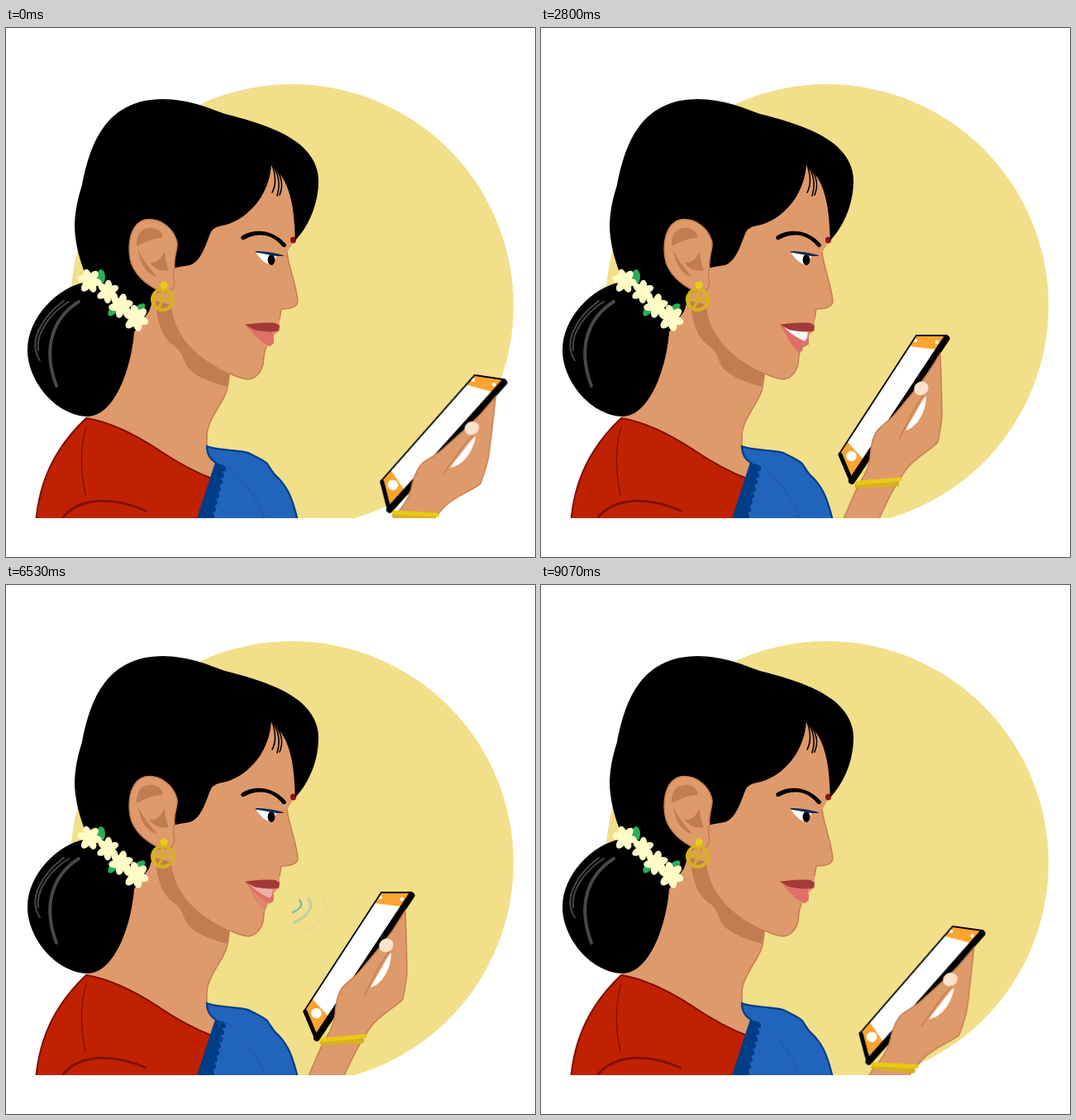
Recreate the animation shown at these times as an HTML page without scripts. Size 640 by 640 pixels, loop 9610 ms.

```html
<!DOCTYPE html>
<html lang="en">
<head>
<meta charset="utf-8">
<title>Talking to a phone</title>
<style>
  html, body { margin: 0; width: 100%; height: 100%; overflow: hidden; background: #fff; }
  svg { display: block; width: 100%; height: 100%; }

  .skin { fill: #df9a6b; }
  .shade { fill: #c17d4f; }
  .edge { stroke: #c47e4f; stroke-width: 1.5; }
  .line { fill: none; stroke-linecap: round; stroke-linejoin: round; }
  .petal { fill: #fffbc6; }
  .leaf { fill: #2bae5a; }
  .gold { stroke: #d6b21e; }
  .upper { fill: #a23b38; }
  .lower { fill: #e06f68; }
  .orange { fill: #fca430; }

  .arm { transform-origin: 454px 372px; animation: reach 9.61s linear infinite; }
  .talk { opacity: 0; animation: talk 9.61s ease-in-out infinite; }
  .wave { opacity: 0; stroke: #3f9fd9; animation: wave 9.61s ease-in-out infinite; }
  .w2 { animation-delay: .11s; }
  .w3 { animation-delay: .22s; }

  @keyframes reach {
    0% { transform: translate(113px, 48px) rotate(8.4deg); }
    24.66%, 79.08% { transform: translate(0, 0) rotate(0deg); }
    94.38%, 100% { transform: translate(44px, 41px) rotate(7.9deg); }
  }
  @keyframes talk {
    0%, 29.12% { opacity: 0; }
    29.13%, 39.54%, 49.95%, 60.35%, 70.76% { opacity: 1; }
    34.34%, 44.75%, 55.15%, 65.56%, 75.96%, 100% { opacity: 0; }
  }
  @keyframes wave {
    0%, 33.82%, 44.22%, 54.63%, 65.04%, 75.44%, 100% { opacity: 0; }
    39.02%, 49.43%, 59.83%, 70.24% { opacity: 1; }
  }
</style>
</head>
<body>
<svg viewBox="0 0 640 640">
  <defs>
    <ellipse id="petal" class="petal" cy="-7" rx="4.8" ry="8"/>
    <g id="flower">
      <use href="#petal" transform="rotate(-75)"/>
      <use href="#petal" transform="rotate(-20)"/>
      <use href="#petal" transform="rotate(40)"/>
      <use href="#petal" transform="rotate(100)"/>
      <use href="#petal" transform="rotate(155)"/>
      <use href="#petal" transform="rotate(215)"/>
    </g>
  </defs>

  <circle cx="346" cy="336" r="268" fill="#f1df8a"/>

  <!-- neck -->
  <path class="skin" d="M150 300 H215 L271 400 C270 420 270 436 262 450 C250 470 243 482 243 494 V506 C244 517 248 523 256 528 L249 548 L97 474 L100 440Z"/>
  <path class="line edge" d="M270 420 C269 432 268 440 262 450 C250 470 243 482 243 494 V506"/>
  <path class="shade" d="M181 330 L200 335 C203 366 222 396 271 418 L267 434 C245 428 225 420 218 408 C214 400 213 392 205 386 C190 376 183 360 181 330Z"/>

  <!-- face -->
  <path class="skin" d="M200 250 L260 180 L322 150 L352 190 L350 255 L341 270 C341 285 351 310 353 330 C353 337 346 340 333 340 L331 352 V366 L324 372 V382 L315 386 C311 395 312 402 311 407 C308 419 300 425 292 425 C285 424 277 421 271 418 C222 396 203 366 200 335Z"/>
  <path class="line edge" d="M340 272 C341 285 351 310 353 330 C353 337 346 340 333 340 L331 352 M315 386 C311 395 312 402 311 407 C308 419 300 425 292 425 C285 424 277 421 271 418"/>
  <ellipse cx="347.5" cy="256.5" rx="3.5" ry="4" fill="#8f1018"/>

  <!-- blouse -->
  <g class="line" stroke="#7f0f0a" stroke-width="2">
    <path fill="#c02100" d="M36 600 C40 545 62 505 97 472 C128 477 157 492 187 512 C208 526 228 537 249 545 L232 600Z"/>
    <path d="M97 483 C90 505 90 535 96 565" stroke-width="1.4"/>
    <path d="M69 592 C90 567 130 567 169 584" stroke-width="2.8"/>
  </g>

  <!-- sari -->
  <path d="M243 506 C255 511 285 511 293 514 C305 520 312 523 316 527 C320 533 324 541 329 544 C343 558 348 575 354 600 H230 L254 526 C247 522 243 515 243 506Z" fill="#2164bc" stroke="#003d87" stroke-width="2.2"/>
  <path d="M254 526 L264 529 L248 600 H229Z" fill="#003d87"/>
  <path class="line" d="M263 533 L247 598" stroke="#003d87" stroke-width="6.5" stroke-dasharray="0 8.5"/>
  <path class="line" d="M268 530 C285 545 302 565 313 592" stroke="#1b54a4" stroke-width="1"/>

  <!-- hair -->
  <path d="M97 300 C90 284 83 260 83 238 C84 215 89 200 92 190 C101 145 118 86 190 86 C225 87 245 97 265 104 C310 115 340 127 358 143 C372 156 379 171 378 188 C377 215 366 240 350 257 C349 240 349 205 335 182 L321 162 C321 182 312 203 300 216 C288 229 276 236 262 239 C256 240 253 241 249 245 C244 253 238 283 222 287 C213 289 210 288 203 291 L195 314 L180 322 L173 343 L155 368 C152 410 132 470 98 470 C58 468 26 425 26 390 C26 350 62 314 97 307Z"/>
  <g class="line" stroke="#000" stroke-width="1.6">
    <path d="M321 163 C326 176 328 188 322 199"/>
    <path d="M322 165 C331 178 332 190 328 203"/>
    <path d="M323 165 C334 179 336 190 331 202"/>
  </g>
  <g class="line" stroke="#484848">
    <path d="M88 331 C58 350 43 385 61 433" stroke-width="4"/>
    <path d="M70 330 C43 350 26 380 41 402" stroke-width="2"/>
    <path d="M76 331 C52 346 36 370 39 390" stroke-width="2"/>
  </g>

  <!-- flowers -->
  <ellipse class="leaf" cx="115" cy="301" rx="5" ry="9"/>
  <ellipse class="leaf" cx="161" cy="340" rx="4.5" ry="9" transform="rotate(50 161 340)"/>
  <ellipse class="leaf" cx="130" cy="341" rx="4.5" ry="9" transform="rotate(40 130 341)"/>
  <use href="#flower" x="101" y="306"/>
  <use href="#flower" transform="translate(123 319) rotate(25) scale(.95)"/>
  <use href="#flower" transform="translate(139 336) rotate(-25)"/>
  <use href="#flower" transform="translate(157 351) rotate(10) scale(1.08)"/>

  <!-- ear -->
  <path class="skin edge" d="M204 290 C202 278 208 268 207 260 C203 241 185 229 168 232 C152 236 147 258 150 278 C153 298 172 312 186 318 C198 323 206 315 203 303 C202 297 203 292 204 290Z"/>
  <g class="shade">
    <path d="M158 264 C157 248 166 240 178 242 C187 244 191 250 189 254 C178 254 168 259 158 264Z"/>
    <path d="M160 268 C165 280 174 291 183 301 C170 298 162 285 160 268Z"/>
    <path d="M192 270 C192 277 194 286 197 293 C187 295 178 291 174 284 C184 284 188 278 192 270Z"/>
  </g>
  <g class="line gold" stroke-width="4">
    <circle cx="189.5" cy="328.5" r="12.5"/>
    <path d="M179 328 H200 M191 318 L186 328 M191 328 L185 338" stroke-width="3"/>
  </g>
  <circle cx="191" cy="311" r="4.6" fill="#e8cb16"/>

  <!-- brow and eye -->
  <path d="M286 251 C302 242 324 244 339 262 C339 266 336 266 334 264 C322 249 305 247 288 256 C284 257 283 253 286 251Z"/>
  <path d="M302 271 L328 275 L321 287 C313 285 307 279 302 271Z" fill="#fff"/>
  <ellipse cx="321" cy="280.5" rx="4.4" ry="6.4"/>
  <path d="M302 270 C312 270 325 271.5 337 275.5 C328 277.5 318 274 302 271.5Z" fill="#0b2b57"/>

  <!-- mouth -->
  <path class="lower" d="M291 361 C302 364 312 366 323 367 L324 380 L320 385 C308 382 300 370 291 361Z"/>
  <g class="talk">
    <path class="lower" d="M290 360 L323 368 L324 383 L317 386 L316 391 L311 392 C302 385 298 372 290 360Z"/>
    <path d="M293 361 C305 365 315 366 323 366 L322 375 L319 379 C308 374 300 368 293 361Z" fill="#fff"/>
  </g>
  <path class="upper" d="M289 359 C300 357 318 356 326 357 L331 360 L330 366 C325 369 308 367 300 365Z"/>

  <!-- voice -->
  <g class="line">
    <path class="wave" d="M355 381 C360 387 356 392 347 396" stroke-width="2.4"/>
    <path class="wave w2" d="M366 380 C373 388 366 401 349 408" stroke-width="3.6"/>
    <path class="wave w3" d="M383 380 C392 390 384 409 358 419" stroke-width="4.6"/>
  </g>

  <!-- arm and phone -->
  <g class="arm">
    <path d="M454 372 H490 L375 547 L361 515Z" fill="#fff"/>
    <path class="orange" d="M454 372 H491 L479 389 L446 385Z"/>
    <path class="orange" d="M371 501 L393 525 L376 547 L362 515Z"/>
    <circle cx="375.5" cy="518" r="6.2" fill="#fff"/>
    <circle cx="453" cy="378" r="2.2" fill="#fff"/>
    <circle cx="479" cy="380" r="2.2" fill="#fff"/>
    <g class="line" stroke="#000">
      <path d="M491 372 H454 L361 515" stroke-width="1.8"/>
      <path d="M362 516 L375 547" stroke-width="5"/>
      <path d="M490.5 375.5 L376 548" stroke-width="8"/>
    </g>
    <path class="skin edge" d="M483 394 C484 420 485 445 485 470 C484 482 482 492 480 501 C474 509 452 520 441 535 C428 553 420 570 409 594 L390 650 H340 L366 594 L382 557 C389 545 396 535 398 520 C399 505 401 495 407 487 C413 480 422 475 430 465 L450 441 L468 418Z"/>
    <path d="M466 445 C466 463 456 483 441 487 C445 478 451 470 455 462 C459 455 462 449 466 445Z" fill="#fff"/>
    <path class="line edge" d="M468 437 C456 452 447 470 434 496"/>
    <ellipse cx="460" cy="436" rx="9" ry="8" fill="#fbe3cb" transform="rotate(-30 460 436)"/>
    <g class="line">
      <path class="gold" d="M382 554 L431 552" stroke-width="5"/>
      <path d="M382 550.5 L434 546" stroke="#e8cb12" stroke-width="5"/>
    </g>
  </g>

  <rect y="593" width="640" height="47" fill="#fff"/>
</svg>
</body>
</html>
```
